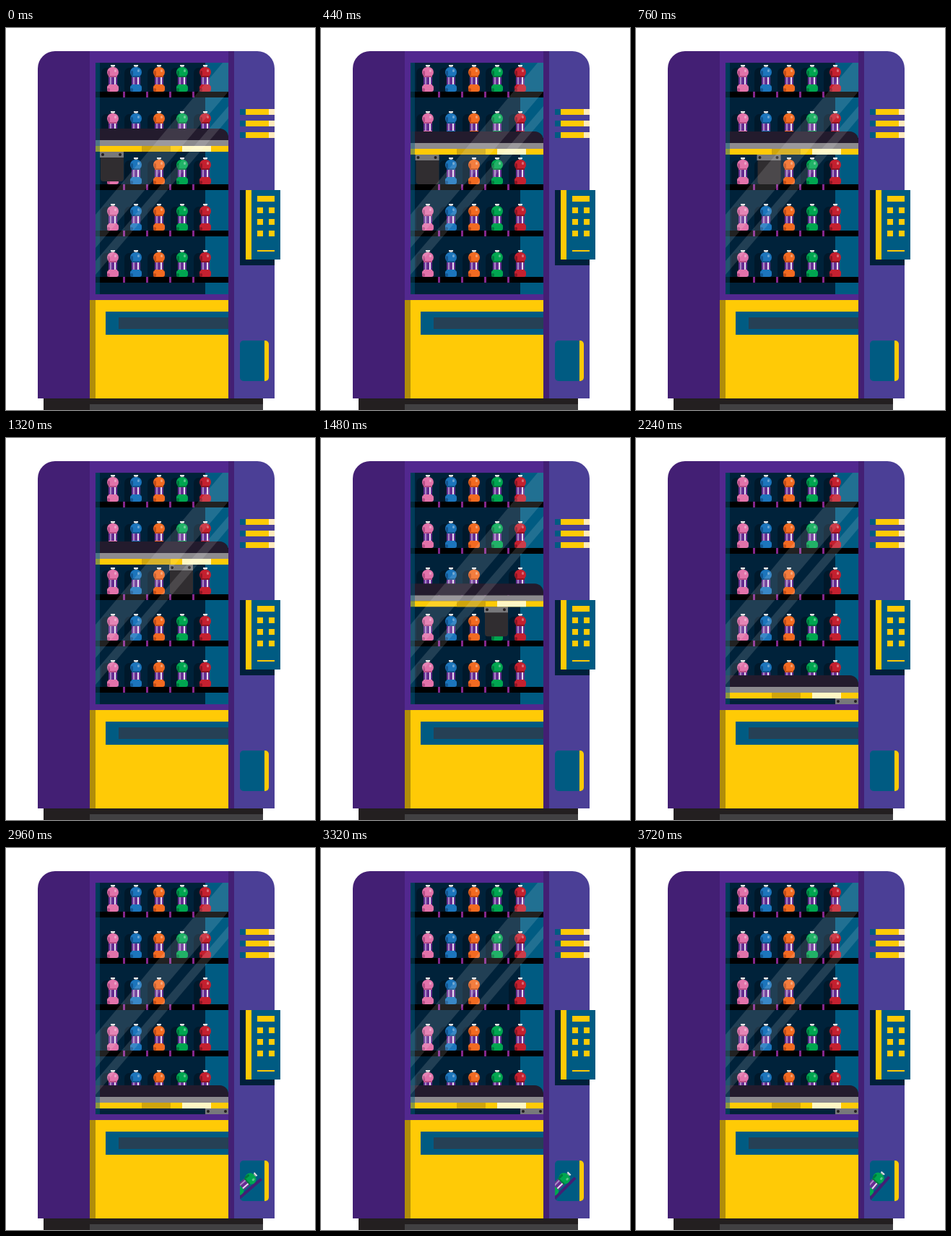
These frames come from a looping animation (428x528 px, 3800 ms). An HTML page with a canvas:

```html
<!DOCTYPE html>
<html lang="en">
<head>
<meta charset="utf-8">
<title>Vending machine</title>
<style>
html, body { margin: 0; width: 100%; height: 100%; overflow: hidden; background: #fff; }
canvas { display: block; }
</style>
</head>
<body>
<canvas id="stage" width="428" height="528"></canvas>
<script>
const ctx = document.getElementById('stage').getContext('2d');
const LOOP = 3800;
const NAVY = '#00223a', TEAL = '#005b82', YELLOW = '#ffca06', PLUM = '#431f74', BLACK = '#231f20';
const BOTTLES = [
  ['#e273aa', '#b94f87'], ['#1c75bc', '#14558f'], ['#f26a21', '#c44d16'],
  ['#00a650', '#007a3c'], ['#c4202f', '#8f1522']
];

function rect(color, x, y, w, h, radius = 0) {
  ctx.fillStyle = color;
  ctx.beginPath();
  ctx.roundRect(x, y, w, h, radius);
  ctx.fill();
}

function poly(color, ...points) {
  ctx.fillStyle = color;
  ctx.beginPath();
  points.forEach(([x, y]) => ctx.lineTo(x, y));
  ctx.fill();
}

function clipped(x, y, w, h, radius, draw) {
  ctx.save();
  ctx.beginPath();
  ctx.roundRect(x, y, w, h, radius);
  ctx.clip();
  draw();
  ctx.restore();
}

// Eased 0..1 progress of time t between two moments.
function ease(t, from, to) {
  const p = Math.min(1, Math.max(0, (t - from) / (to - from)));
  return (1 - Math.cos(Math.PI * p)) / 2;
}

// Bottle standing on (x, y).
function bottle(x, y, [color, shade]) {
  ctx.save();
  ctx.translate(x, y);
  rect('#e6e7e8', -3, -37, 6, 2);
  rect('#a7a9ac', -2, -35, 4, 3);
  rect(color, -8, -34, 16, 14, 7);
  rect(color, -6, -22, 12, 14);
  rect(shade, -6, -22, 12, 2);
  rect('#662d91', -6, -20, 12, 10);
  rect('#e8dff0', 2, -20, 2, 10);
  rect('#a98bc4', -4, -20, 2, 10);
  rect(color, -8, -9, 16, 9, 3);
  rect(shade, -8, -5, 4, 5, 2);
  rect(shade, -7, -29, 3, 7, 1.5);
  rect('rgba(255,255,255,.35)', 2, -31, 3, 4, 1.5);
  ctx.restore();
}

function shelves(t) {
  rect(NAVY, 124, 48, 184, 320);
  rect(TEAL, 276, 48, 32, 320);
  for (let row = 0; row < 5; row++) {
    const y = 88 + row * 64;
    BOTTLES.forEach((colors, col) => {
      if (row === 2 && col === 3 && t >= 1360) return;
      const x = 148 + col * 32;
      rect('#00182a', x - 16, y - 33, 16, 33, [7, 0, 0, 3]);
      bottle(x, y, colors);
    });
    rect('#000', 124, y, 184, 8);
    for (let i = 0; i < 4; i++) rect('#84278d', 162 + i * 32, y, 3, 8);
  }
}

function lift(t) {
  const y = 139 + 4 * ease(t, 0, 160) + 202 * ease(t, 1380, 1660) - 17 * ease(t, 1720, 2040);
  const x = 130 + 96 * ease(t, 400, 1240) + 50 * ease(t, 1680, 2160);
  if (t >= 1360 && t < 1800) bottle(x + 18, y + 77, BOTTLES[3]);
  rect('#302d30', x + 1, y + 36, 32, 37, [0, 0, 4, 4]);
  rect('#77787b', x, y + 32, 33, 8);
  for (const dx of [4, 28]) rect(BLACK, x + dx - 2, y + 34, 4, 4, 2);
  rect('#8c8a8e', 124, y + 16, 184, 8);
  rect('#231b2d', 124, y, 184, 16, [0, 12, 0, 0]);
  rect(YELLOW, 124, y + 24, 184, 8);
  rect('#d0a50c', 188, y + 24, 40, 8);
  rect('#fff7c4', 244, y + 24, 40, 8);
}

function glass() {
  rect('rgba(0,91,130,.45)', 124, 48, 6, 320);
  const shine = 'rgba(255,255,255,.13)';
  poly(shine, [300, 48], [308, 48], [308, 88], [124, 304], [124, 258]);
  poly(shine, [308, 108], [308, 125], [124, 341], [124, 322]);
}

function cabinet() {
  clipped(44, 32, 328, 480, [24, 24, 0, 0], () => {
    rect(PLUM, 44, 32, 72, 480);
    rect('#52288f', 116, 32, 192, 344);
    rect(PLUM, 308, 32, 8, 480);
    rect('#4b3f96', 316, 32, 56, 480);
  });
  rect(YELLOW, 116, 376, 192, 136);
  rect('#b08d0a', 116, 376, 8, 136);
  rect(TEAL, 138, 392, 170, 32);
  rect('#264055', 156, 400, 152, 16);
  rect(BLACK, 52, 512, 304, 16);
  rect('#414042', 116, 520, 240, 8);
  for (const y of [112, 128, 144]) {
    rect(TEAL, 324, y, 8, 8);
    rect(YELLOW, 332, y, 32, 8);
    rect('#ffebbd', 364, y, 8, 8);
  }
}

function keypad() {
  rect('#00203a', 324, 224, 48, 104);
  rect(TEAL, 332, 224, 48, 96);
  rect(YELLOW, 332, 224, 8, 96);
  rect(YELLOW, 348, 232, 24, 8);
  for (const y of [248, 264, 280])
    for (const x of [348, 364]) rect(YELLOW, x, y, 8, 8);
  rect(YELLOW, 348, 307, 24, 2);
}

function hatch(t) {
  clipped(324, 432, 40, 56, 5, () => {
    rect(TEAL, 324, 432, 40, 56);
    const arrive = ease(t, 2480, 2880), tilt = ease(t, 2960, 3640);
    if (arrive > 0) {
      ctx.save();
      ctx.translate(332 - 2 * tilt - 44 * (1 - arrive), 463 + 44 * (1 - arrive));
      ctx.rotate((49 - 8 * tilt) * Math.PI / 180);
      rect(PLUM, 8, -20, 4, 52);
      bottle(0, 18, BOTTLES[3]);
      ctx.restore();
    }
    rect(YELLOW, 358, 432, 6, 56);
  });
}

function draw(now) {
  const t = now % LOOP;
  ctx.clearRect(0, 0, 428, 528);
  cabinet();
  clipped(124, 48, 184, 320, 0, () => {
    shelves(t);
    lift(t);
    glass();
  });
  keypad();
  hatch(t);
  requestAnimationFrame(draw);
}
draw(0);
</script>
</body>
</html>
```
